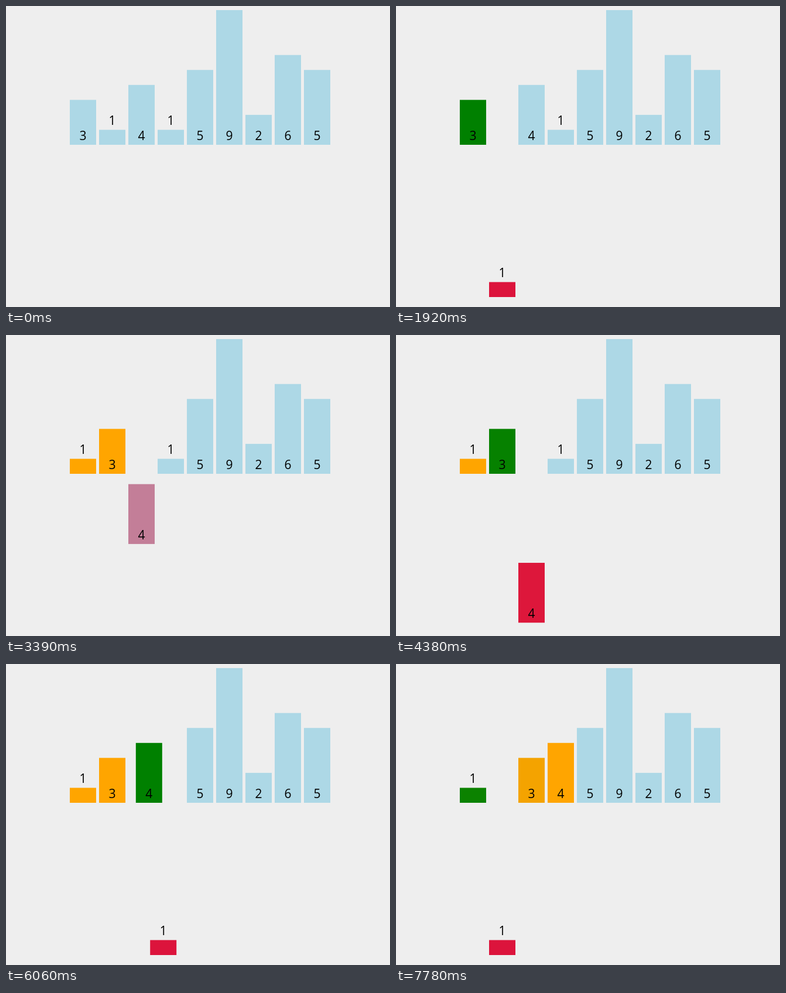
An HTML page with a canvas that plays this animation: 656x514 px, repeating every 8 s.

```html
<!DOCTYPE html>
<html lang="en">
<head>
<meta charset="utf-8">
<title>Insertion sort</title>
<style>
  html, body { margin: 0; width: 100%; height: 100%; overflow: hidden; background: #eee; }
  canvas { display: block; }
</style>
</head>
<body>
<canvas id="stage" width="656" height="514"></canvas>
<script>
const ctx = document.getElementById('stage').getContext('2d');
const LOOP = 8000, DURATION = 300;
const LEFT = 109, PITCH = 50, BAR_W = 45, BASE = 237, DROP = 260;
const UNIT = 230 / 9;
const VALUES = [3, 1, 4, 1, 5, 9, 2, 6, 5];

const BLUE = [173, 216, 230];
const ORANGE = [255, 165, 0];
const GREEN = [0, 128, 0];
const CRIMSON = [220, 20, 60];

const paint = color => ({ color });
const slot = n => ({ slot: n });
const pick = { color: CRIMSON, drop: DROP };
const place = { color: ORANGE, drop: 0 };

// start: when the easing begins; first, last, ticks: the visible updates;
// done: when the step settles; moves: new properties by bar index
const step = (start, first, last, ticks, moves, done = last) =>
  ({ start, first, last, tick: (last - first) / (ticks - 1), moves, done });

const STEPS = [
  step(565, 630, 870, 6, { 0: paint(ORANGE) }),
  step(1100, 1150, 1400, 5, { 1: pick }),
  step(1640, 1720, 1920, 5, { 0: paint(GREEN) }),
  step(2175, 2240, 2460, 6, { 0: slot(1), 1: slot(0) }),
  step(2700, 2740, 2990, 6, { 0: paint(ORANGE), 1: place }),
  step(3244, 3290, 3540, 6, { 2: pick }),
  step(3785, 3830, 3870, 2, { 0: paint(GREEN) }, 4150),
  step(4327, 4380, 4630, 6, { 0: paint(ORANGE), 2: place }),
  step(4863, 4910, 5150, 6, { 3: pick }),
  step(5390, 5430, 5640, 5, { 2: paint(GREEN) }),
  step(5940, 6010, 6260, 6, { 2: slot(3), 3: slot(2) }),
  step(6475, 6540, 6780, 6, { 2: paint(ORANGE), 0: paint(GREEN) }),
  step(7010, 7060, 7310, 6, { 0: slot(2), 3: slot(1) }),
  step(7547, 7640, 7780, 4, { 0: paint(ORANGE), 1: paint(GREEN) }, LOOP)
];

const easeInOut = p => p < 0.5 ? 4 * p ** 3 : 1 - 4 * (1 - p) ** 3;

const mix = (a, b, p) =>
  Array.isArray(a) ? a.map((v, i) => mix(v, b[i], p)) : a + (b - a) * p;

function progress(s, time) {
  if (time < s.first) return 0;
  if (time >= s.done) return 1;
  const ticks = Math.floor((time - s.first) / s.tick + 1e-6);
  const shown = Math.min(s.first + ticks * s.tick, s.last);
  return easeInOut(Math.min((shown - s.start) / DURATION, 1));
}

function barsAt(time) {
  const bars = VALUES.map((value, i) => ({ value, slot: i, drop: 0, color: BLUE }));
  for (const s of STEPS) {
    const p = progress(s, time);
    if (p === 0) break;
    for (const [i, goal] of Object.entries(s.moves)) {
      for (const key in goal) bars[i][key] = mix(bars[i][key], goal[key], p);
    }
  }
  return bars;
}

function drawBar({ value, slot, drop, color }) {
  const x = LEFT + slot * PITCH;
  const bottom = BASE + drop;
  const height = value * UNIT;
  ctx.fillStyle = `rgb(${color.map(Math.round)})`;
  ctx.fillRect(x, bottom - height, BAR_W, height);

  // The label of the shortest bar sits above it
  const baseline = (value === 1 ? bottom - height : bottom) - 8;
  ctx.fillStyle = '#000';
  ctx.fillText(value, x + BAR_W / 2, baseline);
}

function draw(time) {
  ctx.fillStyle = '#eee';
  ctx.fillRect(0, 0, 656, 514);
  ctx.font = '21px "Open Sans", "Noto Sans", sans-serif';
  ctx.textAlign = 'center';
  barsAt(time).forEach(drawBar);
}

const origin = performance.now();
function frame() {
  draw((performance.now() - origin) % LOOP);
  requestAnimationFrame(frame);
}
frame();
</script>
</body>
</html>
```
